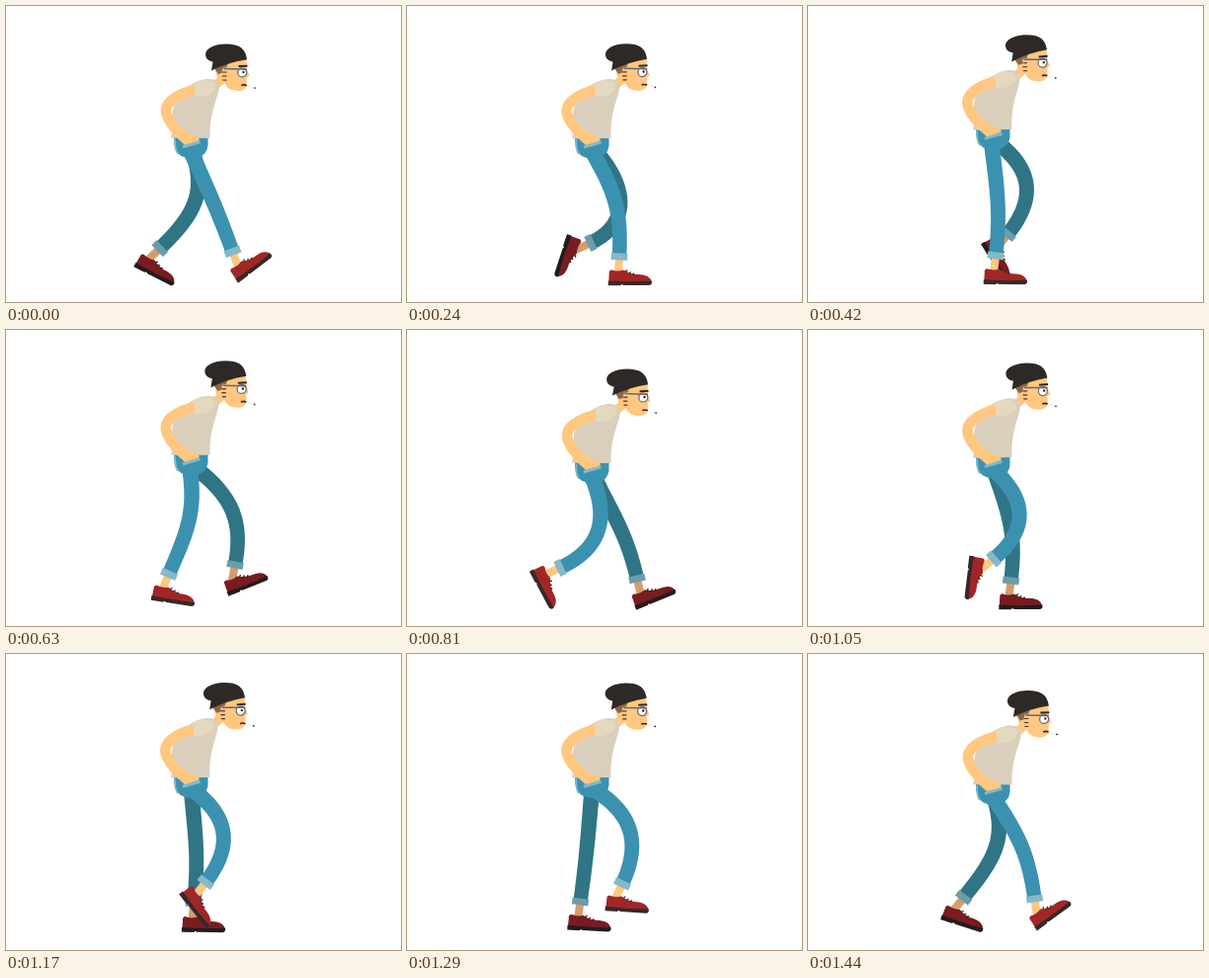
These frames come from a looping animation (400x300 px, 1470 ms). An HTML page with a canvas:

```html
<!DOCTYPE html>
<html lang="en">
<head>
<meta charset="utf-8">
<title>Walk cycle</title>
<style>
  html, body { margin: 0; width: 100%; height: 100%; overflow: hidden; background: #fff; }
  canvas { display: block; width: 400px; height: 300px; }
</style>
</head>
<body>
<canvas id="stage"></canvas>
<script>
const LOOP = 1470, STEP = 30, HALF = LOOP / 2, RAD = Math.PI / 180;
const canvas = document.getElementById('stage');
const ctx = canvas.getContext('2d');
const ratio = window.devicePixelRatio || 1;
canvas.width = 400 * ratio;
canvas.height = 300 * ratio;

// time, cuff x, cuff y, shin angle, thigh angle, shoe angle
const STRIDE = [
  [0, 229.5, 249, -20, -24, -37],
  [75, 231, 252, -13, -26, -22],
  [240, 215, 254, 3, -30, 0],
  [315, 203.5, 254, 7, -19, 0],
  [555, 173.5, 251, 8, 5, 3],
  [630, 165, 247.5, 23, -9, 9],
  [720, 154.5, 246.5, 42, -20, 22],
  [810, 155, 241, 65, -24, 62],
  [975, 184, 240, 65, -45, 108],
  [1050, 188, 232, 50, -49, 97],
  [1290, 218, 233, 25, -60, 4],
  [1365, 230, 238, 11, -54, -22],
  [1440, 229.5, 248, -8, -34, -36]
];

const NEAR = { cloth: '#3b92b0', cuff: '#86b9c8', skin: '#ffc77f', shoe: '#a32626', sole: '#35292a', dx: 0 };
const FAR = { cloth: '#2f7585', cuff: '#6c9dab', skin: '#d59c6c', shoe: '#781c20', sole: '#221c1c', dx: 2 };

const wave = (t, peak) => Math.cos((t - peak) / HALF * 2 * Math.PI);
const down = deg => [-Math.sin(deg * RAD), Math.cos(deg * RAD)];

function key(i) {
  const n = STRIDE.length, turn = Math.floor(i / n);
  const k = STRIDE[i - turn * n].slice();
  k[0] += turn * LOOP;
  return k;
}

// Smooth cyclic interpolation through the stride poses
function pose(t) {
  t = (t + LOOP) % LOOP;
  let i = STRIDE.length - 1;
  while (STRIDE[i][0] > t) i--;
  const [a, b, c, d] = [key(i - 1), key(i), key(i + 1), key(i + 2)];
  const span = c[0] - b[0], u = (t - b[0]) / span, v = 1 - u;
  return b.map((p, j) => {
    const m = (c[j] - a[j]) / (c[0] - a[0]) * span;
    const n = (d[j] - b[j]) / (d[0] - b[0]) * span;
    return p * v * v * (1 + 2 * u) + c[j] * u * u * (3 - 2 * u) + m * u * v * v - n * u * u * v;
  });
}

function fill(path, color) {
  ctx.fillStyle = color;
  ctx.fill(new Path2D(path));
}

function line(path, color, width) {
  ctx.strokeStyle = color;
  ctx.lineWidth = width;
  ctx.stroke(new Path2D(path));
}

function dot(x, y, r, color) {
  ctx.fillStyle = color;
  ctx.beginPath();
  ctx.arc(x, y, r, 0, 7);
  ctx.fill();
}

function at(x, y, deg, draw) {
  ctx.save();
  ctx.translate(x, y);
  ctx.rotate(deg * RAD);
  draw();
  ctx.restore();
}

// Tapered limb along a cubic curve
function trouser(p0, p1, p2, p3, color) {
  const left = [], right = [], N = 24;
  for (let i = 0; i <= N; i++) {
    const u = i / N, v = 1 - u;
    const pt = j => v * v * v * p0[j] + 3 * v * v * u * p1[j] + 3 * v * u * u * p2[j] + u * u * u * p3[j];
    const tan = j => v * v * (p1[j] - p0[j]) + 2 * u * v * (p2[j] - p1[j]) + u * u * (p3[j] - p2[j]);
    const dx = tan(0), dy = tan(1), w = (7.9 - 0.7 * u) / Math.hypot(dx, dy);
    left.push([pt(0) - dy * w, pt(1) + dx * w]);
    right.unshift([pt(0) + dy * w, pt(1) - dx * w]);
  }
  ctx.beginPath();
  left.concat(right).forEach(p => ctx.lineTo(p[0], p[1]));
  ctx.fillStyle = color;
  ctx.fill();
}

function shoe(c) {
  fill('M-10 12L-9.5 1Q-8 -1.5 -5 0Q0 1.5 5 -0.5Q11 3.5 18 4Q32 3.5 33.5 12Z', c.shoe);
  fill('M-10.5 10.5Q10 12 33.5 10.5Q34.5 14.5 31 15H5L3 14L2 15.3H-10.5Z', c.sole);
  line('M7 1.5L9 -0.5M10.5 3.5L12.5 1.5M14 4.5L16 2.8', c.sole, 1.2);
}

function leg(t, hipY, c) {
  const [, px, y, shin, thigh, foot] = pose(t);
  const x = px + c.dx, reach = 48;
  const s = down(shin), h = down(thigh), hip = [185.5 + c.dx, hipY];
  const ax = x + s[0] * 14, ay = y + s[1] * 14;
  line(`M${x} ${y}L${ax + s[0] * 2} ${ay + s[1] * 2}`, c.skin, 8);
  at(ax, ay, foot, () => shoe(c));
  trouser(hip, [hip[0] + h[0] * reach, hipY + h[1] * reach],
    [x - s[0] * reach, y - s[1] * reach], [x, y], c.cloth);
  at(x, y, shin, () => fill('M-8.3 -3.5H8.3V3.5H-8.3Z', c.cuff));
}

function head() {
  line('M219 73L207 83', '#ffc77f', 9);
  fill('M211 60L243 52L243.5 63L246 69.5L243.5 71.5L243.5 79Q242 85 235 85Q224 85 221 77L214 74Z', '#ffc77f');
  fill('M209 60L225 55L223 61L219 62L218 67L214.5 68Z', '#8a6648');
  line('M218.5 66H223M218.5 70H223M219 74H223', '#4a3830', 1.2);
  dot(238.8, 66.3, 4.4, '#fff');
  dot(240, 65.8, 1.2, '#222');
  line('M220 62.5L243.5 63', '#5f6873', 1.5);
  line('M234.3 66.3a4.5 4.5 0 1 0 9 0a4.5 4.5 0 1 0 -9 0', '#5f6873', 1.2);
  line('M235 60L244 59.5', '#2d2926', 2);
  line('M238 79.5Q240 78 243.5 79.5', '#3a2320', 1.6);
  line('M243.5 79.5L251 81.6', '#efebe6', 1.2);
  dot(251.7, 81.8, 0.9, '#4a2a22');
  fill('M243.5 53C242 42 236 37.5 222 37.5C211 37.5 201.5 42 201.5 48C201.5 53 206 55 209 55.5L207.5 64.5Q224 56 243.5 53Z', '#2d2926');
}

function torso() {
  fill('M167 133C170 122 167 112 169 103C172 90 184 79 195 75C206 71 216 73 215.5 82C215 92 206 104 206.5 133Z', '#dacfbc');
}

function arm() {
  line('M195 83C172 88 156 98 164 113C168 122 175 128 183 133', '#ffc77f', 10.5);
  fill('M174 124Q184 127 194 132Q198 135 193 136.5L181 140L171 131Z', '#ffc77f');
  fill('M189 78Q200 72 209 76Q214 80 209 86Q202 92 191 91Q192 84 189 78Z', '#e4d9bf');
}

function hips() {
  fill('M170 130H204.5V141Q203 151 193 153Q184 155 177 151Q169 146 170 130Z', '#3b92b0');
}

function draw(t) {
  // Flattened wave: the body lingers high and low, and moves quickly between
  const bob = 5.05 * Math.tanh(2 * wave(t, 124)) - 3;
  const lean = 0.75 * wave(t, 50) - 0.3;
  ctx.setTransform(ratio, 0, 0, ratio, 0, 0);
  ctx.fillStyle = '#fff';
  ctx.fillRect(0, 0, 400, 300);
  leg(t + HALF, 143 + bob, FAR);
  at(0, bob, 0, hips);
  leg(t, 143 + bob, NEAR);
  at(0, bob, 0, () => {
    line('M171.3 134Q170.5 144 174 149', '#86b9c8', 1.8);
    line('M179 142L196.5 137', '#86b9c8', 3);
  });
  at(187, 133 + bob, lean, () => {
    ctx.translate(-187, -133);
    head();
    torso();
    arm();
  });
}

function tick(now) {
  draw(Math.floor((now % LOOP) / STEP) * STEP);
  requestAnimationFrame(tick);
}
draw(0);
requestAnimationFrame(tick);
</script>
</body>
</html>
```
